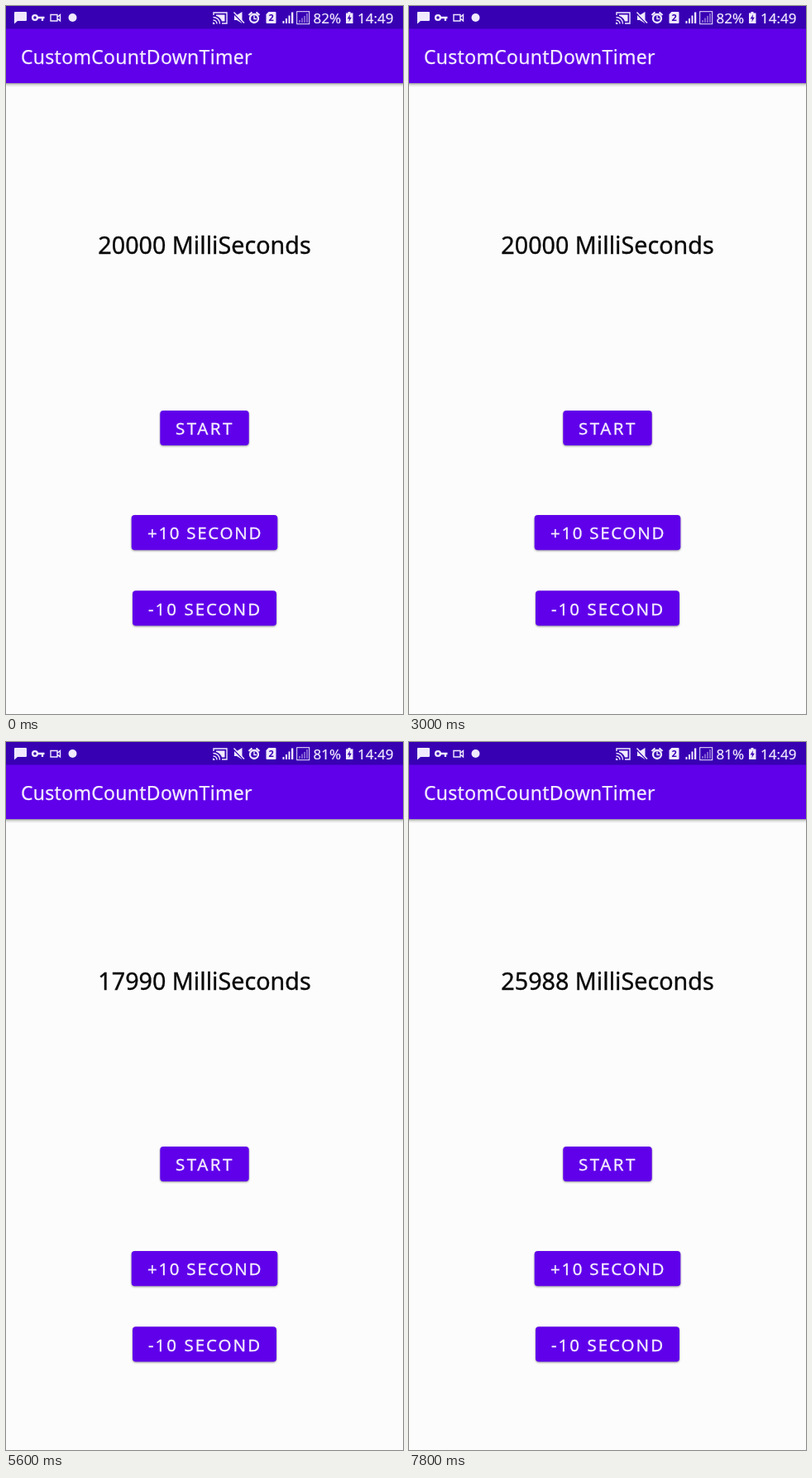
An HTML page for the animation above (8000 ms loop, 480x854 px).

```html
<!DOCTYPE html>
<html lang="en">
<head>
<meta charset="utf-8">
<title>Countdown timer</title>
<style>
  html, body { margin: 0; width: 100%; height: 100%; overflow: hidden; background: #fcfcfc; }
  svg { display: block; width: 100%; height: 100%; font-family: "Noto Sans", sans-serif; }
  .button { fill: #6000ea; filter: drop-shadow(0 1px 1.3px rgba(0, 0, 0, .4)); }
  .label { font-size: 20.5px; fill: #f5edff; stroke: #f5edff; stroke-width: .3; }
  .status { font-size: 17px; fill: #f0eaff; stroke: #f0eaff; stroke-width: .2; }
  .icon { fill: #f0eaff; }
  .line { fill: none; stroke: #f0eaff; stroke-width: 1.4; }
  .bold { stroke-width: 2.3; }
</style>
</head>
<body>
<svg viewBox="0 0 480 854">
  <defs>
    <linearGradient id="barShadow" x2="0" y2="1">
      <stop stop-color="#000" stop-opacity=".4"/>
      <stop offset=".4" stop-color="#000" stop-opacity=".13"/>
      <stop offset="1" stop-color="#000" stop-opacity="0"/>
    </linearGradient>
    <clipPath id="startShape"><rect x="186.300" y="488" width="107.400" height="42" rx="4"/></clipPath>
  </defs>

  <rect width="480" height="854" fill="#fcfcfc"/>
  <rect y="93" width="480" height="5" fill="url(#barShadow)"/>
  <rect y="27" width="480" height="66" fill="#6000ea"/>
  <rect width="480" height="27.500" fill="#3800b3"/>

  <!-- notification icons -->
  <path class="icon" d="M11 7H24Q25 7 25 8V17Q25 18 24 18H14L10 21.500V8Q10 7 11 7Z"/>
  <circle class="line bold" cx="35" cy="14" r="2.900"/>
  <path class="line bold" d="M38 14H46.500M44 14V18"/>
  <path class="line" d="M54 10.500H62V18H54ZM62 13.500L65.500 10.500V18L62 15"/>
  <circle class="icon" cx="80.500" cy="14" r="5"/>

  <!-- cast -->
  <path class="line" d="M251 11V8H267V21H261M250.500 13.500A8 8 0 0 1 258.500 21.500M250.500 17A4.500 4.500 0 0 1 255 21.500"/>
  <path class="icon" d="M250 19.500A2.500 2.500 0 0 1 252.500 22H250ZM254 10.500H264.500V18.500H261Q259 13 254 12Z"/>
  <!-- muted speaker -->
  <path class="icon" d="M276 11H279L285.500 7V21L279 17H276Z"/>
  <path d="M275 9L287 21" stroke="#3800b3" stroke-width="1.500"/>
  <path class="line" d="M275.500 7.500L288 20.500"/>
  <!-- alarm -->
  <circle class="line bold" cx="300" cy="15" r="5"/>
  <path class="line" d="M300 11.500V15.500H303"/>
  <path class="line bold" d="M293.500 11L297.500 7.500M306.500 11L302.500 7.500"/>
  <!-- SIM -->
  <path class="icon" d="M317.500 7H325.500Q326.500 7 326.500 8V20Q326.500 21 325.500 21H315.500Q314.500 21 314.500 20V10Z"/>
  <text x="320.600" y="18.200" font-size="11" font-weight="700" text-anchor="middle" fill="#3800b3">2</text>
  <!-- signal -->
  <path class="icon" d="M334.500 18H336.500V21H334.500ZM338 15H340V21H338ZM341.500 11.500H343.500V21H341.500ZM345 7.500H347.300V21H345Z"/>
  <rect class="line" x="351.700" y="6.700" width="15" height="15" style="stroke-width: 1"/>
  <path class="icon" opacity=".4" d="M354 17H356V20H354ZM357 14.500H359V20H357ZM360 12H362V20H360ZM363 9H365V20H363Z"/>
  <text class="status" id="battery" x="371.500" y="21"></text>
  <path class="icon" d="M413.500 7H416.500V8.500H419.500V21H411V8.500H413.500Z"/>
  <path d="M416 10L412.700 15.500H415L414.300 19.500L417.800 13.800H415.500Z" fill="#3800b3"/>
  <text class="status" x="425" y="21">14:49</text>

  <text x="17.900" y="70" font-size="23" letter-spacing=".3" fill="#f5edff" stroke="#f5edff" stroke-width=".25">CustomCountDownTimer</text>
  <text id="timer" x="240" y="299" font-size="28.700" text-anchor="middle" fill="#080808" stroke="#080808" stroke-width=".35"></text>

  <rect class="button" x="186.300" y="488" width="107.400" height="42" rx="4"/>
  <g clip-path="url(#startShape)"><circle id="ripple" cx="270" cy="500" fill="#fff"/></g>
  <rect class="button" x="151.700" y="614" width="176.600" height="42.300" rx="4"/>
  <rect class="button" x="153" y="705.200" width="174" height="42.300" rx="4"/>
  <text class="label" x="205" y="517.300" letter-spacing="2.500">START</text>
  <text class="label" x="171" y="643.400" letter-spacing="1.700">+10 SECOND</text>
  <text class="label" x="172" y="734.600" letter-spacing="2">-10 SECOND</text>
</svg>
<script>
  const LOOP = 8000, STEP = 200;
  const STARTED = 3600, EXTENDED = 7600, BATTERY_DROP = 4200;
  const [timer, battery, ripple] = ["timer", "battery", "ripple"].map(id => document.getElementById(id));
  const clamp = v => Math.min(1, Math.max(0, v));

  function remaining(t) {
    if (t < STARTED) return 20000;
    const ticks = Math.floor((t - STARTED) / 1000);
    return 19992 - ticks * 1001 + (t >= EXTENDED ? 10000 : 0);
  }

  function draw(t) {
    timer.textContent = `${remaining(t)} MilliSeconds`;
    battery.textContent = t < BATTERY_DROP ? "82%" : "81%";
    // The ripple spreads until release, then fades.
    ripple.setAttribute("r", 85 * clamp((t - STARTED + 200) / 200) + 30 * clamp((t - STARTED) / 200));
    ripple.setAttribute("opacity", 0.36 * (1 - clamp((t - STARTED) / 400)));
  }

  function frame() {
    const t = performance.now() % LOOP;
    draw(Math.floor(t / STEP) * STEP);
    requestAnimationFrame(frame);
  }
  frame();
</script>
</body>
</html>
```
